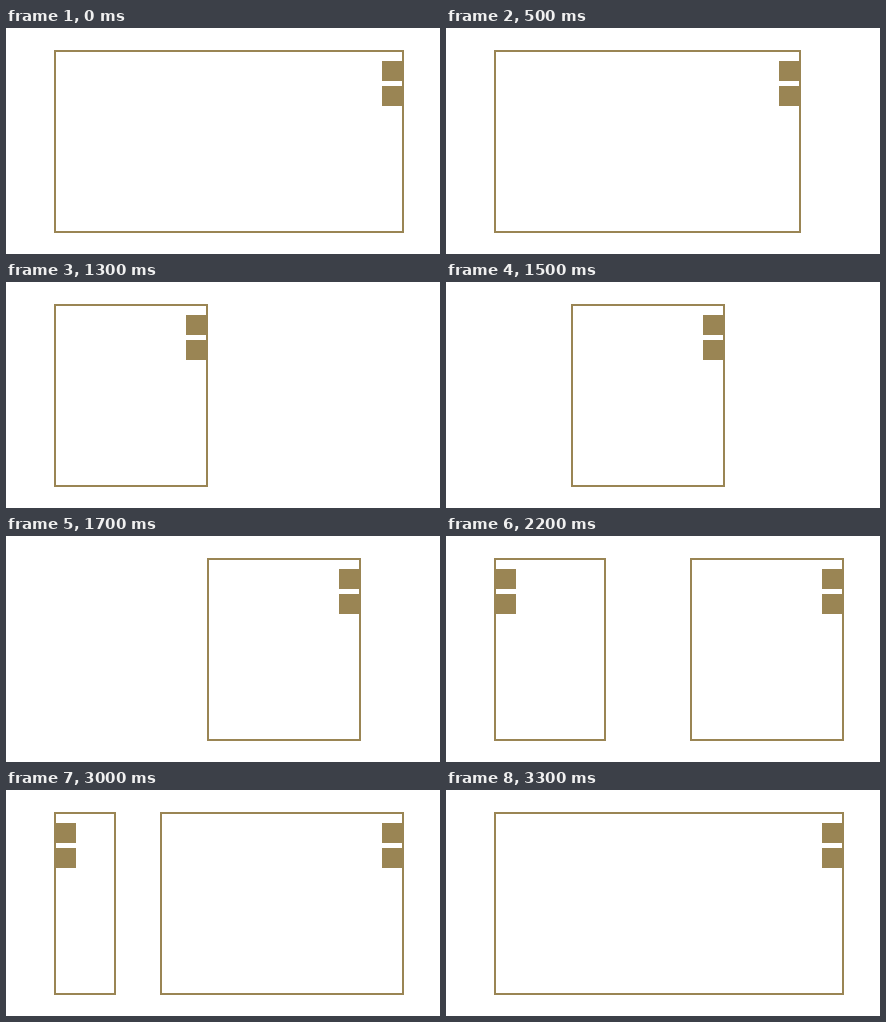
Animation, 434 px wide and 226 px high, one loop 3.4 s. Source, as an HTML page with a canvas:

```html
<!DOCTYPE html>
<html lang="en">
<head>
<meta charset="utf-8">
<title>Resizing panels</title>
<style>
html, body { margin: 0; width: 100%; height: 100%; overflow: hidden; background: #fff; }
canvas { display: block; }
</style>
</head>
<body>
<canvas id="stage" width="434" height="226"></canvas>
<script>
const ctx = document.getElementById("stage").getContext("2d");
const LOOP = 3400, STEP = 100;
const TOP = 22, BOTTOM = 205, LEFT = 48, LINE = 2;
const TAB = { w: 22, h: 20, ys: [33, 58] };
const HALF = 154;

// Key points: [ms, x]
const rightEdge = [[400, 398], [500, 355], [600, 315], [900, 202],
                   [1300, 202], [1700, 355], [1800, 398]];
const dragEdge = [[1300, LEFT], [1700, 201], [1800, 244], [2700, 244], [3200, 94]];
const sideEdge = [[1920, LEFT], [2300, 200], [2700, 200], [3200, LEFT + LINE]];

function track(keys, t) {
  if (t <= keys[0][0]) return keys[0][1];
  for (let i = 1; i < keys.length; i++) {
    const [t0, a] = keys[i - 1], [t1, b] = keys[i];
    if (t <= t1) return Math.round(a + (b - a) * (t - t0) / (t1 - t0));
  }
  return keys[keys.length - 1][1];
}

function panel(x0, x1, tabX, hidden = -1) {
  const w = x1 - x0, h = BOTTOM - TOP;
  ctx.save();
  ctx.beginPath();
  ctx.rect(x0, TOP, w, h);
  ctx.clip();
  ctx.fillRect(x0, TOP, w, LINE);
  ctx.fillRect(x0, BOTTOM - LINE, w, LINE);
  ctx.fillRect(x0, TOP, LINE, h);
  ctx.fillRect(x1 - LINE, TOP, LINE, h);
  TAB.ys.forEach((y, i) => {
    if (i !== hidden) ctx.fillRect(tabX, y, TAB.w, TAB.h);
  });
  ctx.restore();
}

// A tab blinks just before the side panel opens or closes.
function blinking(t) {
  if (t >= 1900 && t < 2000) return 0;
  if (t >= 2600 && t < 2700) return 1;
  return -1;
}

function draw(t) {
  ctx.fillStyle = "#fff";
  ctx.fillRect(0, 0, 434, 226);
  ctx.fillStyle = "#9a8554";

  const right = track(rightEdge, t);
  let left = track(dragEdge, t);
  if (t > 1300 && t < 1800) left = right - HALF;
  if (t >= 3300) left = LEFT;
  panel(left, right, right - TAB.w, blinking(t));

  if (t > 1920 && t < 3300) panel(LEFT, track(sideEdge, t), LEFT);
}

const start = performance.now();
function tick() {
  const t = (performance.now() - start) % LOOP;
  draw(Math.floor(t / STEP) * STEP);
  requestAnimationFrame(tick);
}
tick();
</script>
</body>
</html>
```
